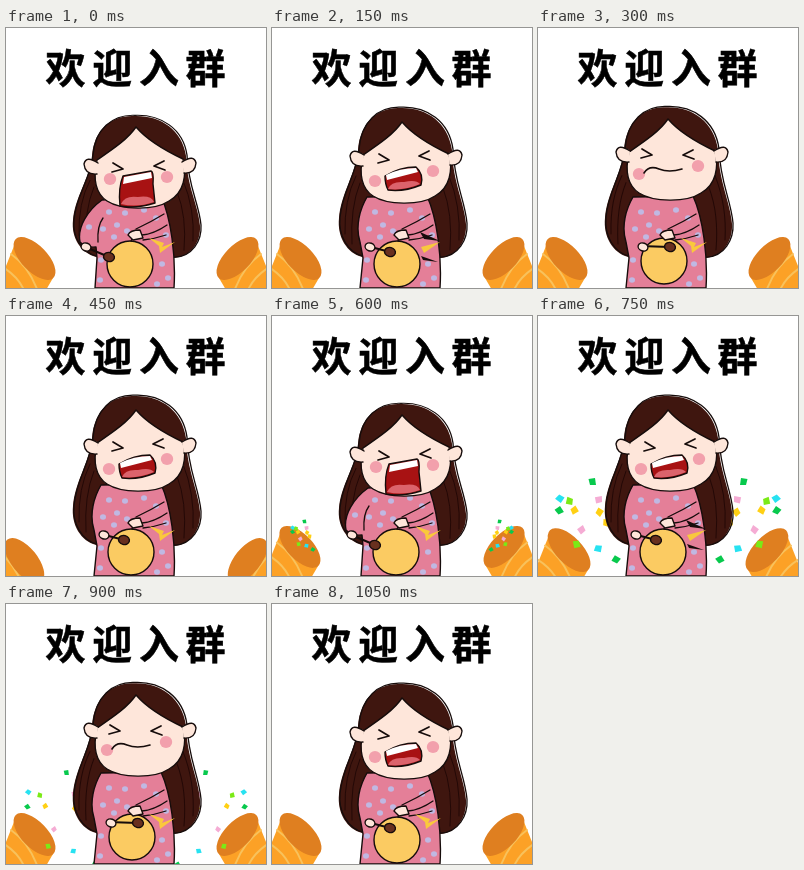
Recreate the animation shown at these times as an HTML page. Size 260 by 260 pixels, loop 1.2 s.

```html
<!DOCTYPE html>
<html lang="zh">
<head>
<meta charset="utf-8">
<style>
html, body { margin: 0; width: 100%; height: 100%; overflow: hidden; background: #fff; }
svg { display: block; width: 100%; height: 100%; }
text { font: 700 40px "Noto Sans CJK SC", "Noto Sans CJK", sans-serif; letter-spacing: 6.7px; stroke: #000; stroke-width: .5; }
.ink { stroke: #160c0b; stroke-width: 1.4; stroke-linejoin: round; stroke-linecap: round; }
.line { fill: none; }
</style>
</head>
<body>
<svg viewBox="0 0 260 260">
  <text x="39.5" y="54.5">欢迎入群</text>
  <g id="scene"></g>
</svg>
<script>
const STEP = 150, STEPS = 8;
const HAIR = '#3f160f', SKIN = '#fee6da', PINK = '#e47f98', DOT = '#c0b8e2', GONG = '#fbcb62';
const RED = '#a81213', TONGUE = '#dc636c';

const path = (d, fill, cls = 'ink') => `<path d="${d}" fill="${fill}" class="${cls}"/>`;
const stroke = (d, color = '#160c0b', width = 1.3) =>
  `<path d="${d}" class="ink line" style="stroke:${color};stroke-width:${width}"/>`;
const oval = (x, y, rx, ry, fill, cls = '', turn = 0) =>
  `<ellipse cx="${x}" cy="${y}" rx="${rx}" ry="${ry}" fill="${fill}" class="${cls}" transform="rotate(${turn} ${x} ${y})"/>`;
const group = (transform, content) => `<g transform="${transform}">${content}</g>`;
const bothSides = content => content + group('translate(260 0) scale(-1 1)', content);

// Each pose: hair squash, face drop, features, and gong and mallet positions.
const poses = {
  shout: {
    hair: 0.946, drop: 5, ears: [139, 138],
    eyes: [[116, 141], [149, 138]], cheeks: [[104, 151], [161, 149]],
    gong: [124, 236], mallet: [[77, 218], [103, 229]],
    mouth: path('M117 148L145 143Q148 144 147 156L149 175Q130 181 114 178Q112 160 117 148Z', RED) +
      path('M118 149L145 144L146 150L117 156Z', '#fff', '') +
      path('M115 176Q119 167 132 169Q145 167 148 174Q131 180 115 176Z', TONGUE, '')
  },
  sing: {
    hair: 1, drop: 0, ears: [131, 130],
    eyes: [[116, 132], [148, 128]], cheeks: [[103, 153], [161, 143]],
    gong: [125, 236], mallet: [[95, 218], [118, 224]],
    mouth: path('M113 148Q128 139 144 139Q152 146 149 157Q132 164 116 162Q113 156 113 148Z', RED) +
      path('M114 147Q128 140 144 140L146 144L115 152Z', '#fff', '') +
      path('M116 161Q119 153 132 154Q144 151 148 156Q132 163 116 161Z', TONGUE, '')
  },
  hush: {
    hair: 1.005, drop: -3, ears: [127, 127],
    eyes: [[113, 127], [146, 127]], cheeks: [[101, 146], [160, 138]],
    gong: [126, 233], mallet: [[102, 218], [132, 219]],
    mouth: stroke('M106 145Q111 137 121 141Q131 145 144 141', '#160c0b', 1.6)
  }
};
const sequence = ['shout', 'sing', 'hush', 'sing'];

function hair(scale) {
  const shape = 'M128 80C105 79 88 95 86 122C84 146 69 165 67 190C65 209 75 225 90 229L168 230' +
    'C185 229 195 213 194 196C192 173 181 155 180 122C176 94 154 79 128 80Z';
  return group(`translate(0 ${229 * (1 - scale)}) scale(1 ${scale})`,
    path(shape, HAIR, '') + group('translate(1 -.8)', stroke(shape)) +
    ['M84 148Q72 172 73 206', 'M88 155Q78 180 80 216', 'M177 148Q189 178 187 212',
      'M171 160Q181 186 178 222'].map(d => stroke(d, '#230806', 1)).join(''));
}

function body(shouting) {
  const dots = [[103, 184], [119, 185], [138, 182], [150, 190], [111, 197], [97, 201], [121, 203],
    [108, 209], [160, 207], [95, 232], [156, 236], [162, 250], [94, 252], [151, 256]];
  const left = shouting
    ? 'M96 172C82 182 71 199 74 214Q79 220 90 219L91 230L89 260'
    : 'M95 169C88 181 83 198 88 214L91 230L88 260';
  return path(left + 'L168 260C170 228 165 190 155 168Z', PINK) +
    dots.map(([x, y]) => oval(x, y, 3, 2.8, DOT)).join('') +
    (shouting ? oval(83, 199, 3, 2.8, DOT) + stroke('M97 190Q91 198 92 214') : '') +
    stroke('M158 186Q145 194 130 201M161 197Q148 206 136 207M160 207Q148 211 137 212');
}

function face(p) {
  const [[lx, ly], [rx, ry]] = p.eyes;
  const [le, re] = p.ears;
  const skin = 'M130 94C122 106 107 116 91 127C87 145 89 160 101 168C115 177 148 178 163 168' +
    'C178 160 181 142 177 126C160 118 142 108 130 94Z';
  return group(`translate(0 ${p.drop})`, path(skin, SKIN)) +
    path(`M92 ${le - 4}Q80 ${le - 12} 78 ${le - 3}Q79 ${le + 8} 91 ${le + 7}`, SKIN) +
    path(`M176 ${re - 4}Q188 ${re - 12} 190 ${re - 3}Q189 ${re + 8} 178 ${re + 7}`, SKIN) +
    p.cheeks.map(([x, y]) => oval(x, y, 6.2, 6, '#f2a0ac')).join('') +
    stroke(`M${lx - 9} ${ly - 6}l10 6l-11 3M${rx + 9} ${ry - 5}l-10 5l11 4`, '#160c0b', 1.7) + p.mouth;
}

function gong(p, struck) {
  const [x, y] = p.gong, [[ax, ay], [bx, by]] = p.mallet;
  const spark = struck
    ? path('M148 204L168 213L152 211Z', '#160c0b', '') + path('M149 219L168 214L152 225Z', '#f8c83e', '') +
      path('M149 228L166 234L151 232Z', '#160c0b', '')
    : path('M143 210L158 215L156 219L169 214L154 225L153 218Z', '#fac83c', '');
  return spark + oval(x, y, 23, 23, GONG, 'ink') + stroke(`M128 207L${x + 1} ${y - 23}`) +
    path('M134 202Q124 202 122 207L127 212L137 210Z', SKIN) +
    stroke(`M${ax} ${ay}L${bx} ${by}`, '#160c0b', 2) +
    oval(bx, by, 5.5, 4.5, '#69301f', 'ink', 15) + oval(ax + 3, ay + 1, 5, 4, SKIN, 'ink', 20);
}

function popper(placement) {
  return group(placement,
    path('M10 213L-8 258L10 275L40 262L47 250Z', '#fca126', '') +
    stroke('M5 226Q22 238 31 261M-2 240Q12 249 18 262', '#f8c25c', 2) +
    oval(28.5, 230.5, 27, 13, '#df7f20', '', 46));
}

const flakes = [[54, 166], [36, 194], [22, 182], [32, 185], [61, 184], [21, 195],
  [61, 196], [60, 232], [39, 228], [44, 214], [78, 244], [68, 207]];
const flakeColors = ['#08c94d', '#ffd013', '#27e2f1', '#7bea16', '#f5acd4'];

function confetti(spread, fall, size) {
  return flakes.map(([x, y], i) => group(
    `translate(${20 + (x - 20) * spread} ${228 + (y - 228) * spread + fall}) rotate(${i * 67}) scale(${size})`,
    `<path d="M-3.5 -3L3 -4L4 3L-2 3Z" fill="${flakeColors[i % 5]}"/>`)).join('');
}

const popperMotion = {
  3: 'translate(-10 14) rotate(5 28 230)',
  4: 'translate(0 5) scale(.98)',
  5: 'translate(2 -1) scale(1.02)'
};
const bursts = { 4: [0.36, 0, 0.55], 5: [1, 0, 1], 6: [1.18, 14, 0.7] };

function draw(step) {
  const name = sequence[step % 4], p = poses[name];
  return bothSides(popper(popperMotion[step] || '') + (bursts[step] ? confetti(...bursts[step]) : '')) +
    hair(p.hair) + body(name === 'shout') + face(p) + gong(p, step % 4 === 1);
}

const scene = document.getElementById('scene');
let shown = -1;
function tick() {
  const step = Math.floor(performance.now() / STEP) % STEPS;
  if (step !== shown) scene.innerHTML = draw(shown = step);
  requestAnimationFrame(tick);
}
tick();
</script>
</body>
</html>
```
